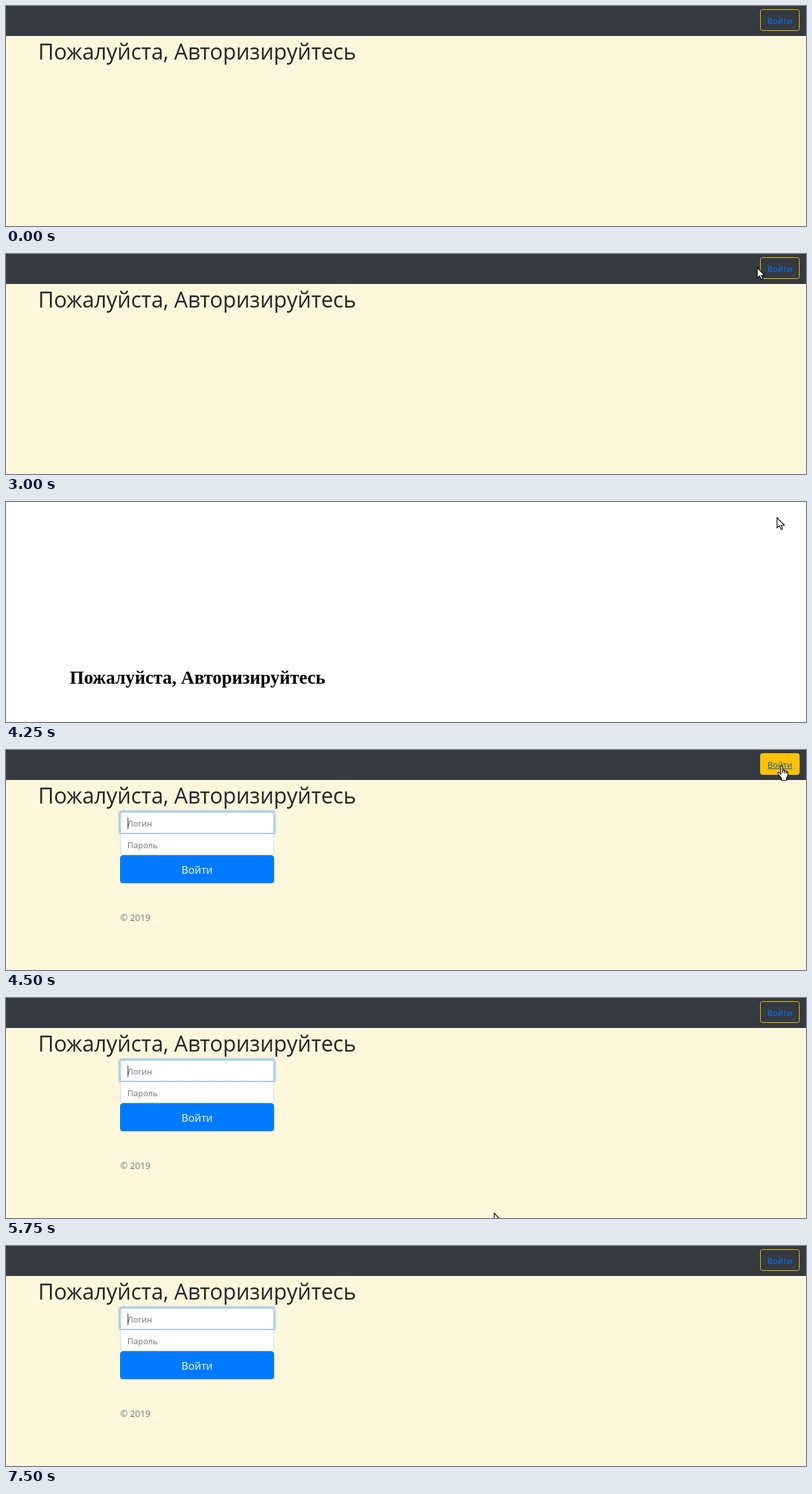
These frames come from a looping animation (1256 px wide and 345 px high, 7.75 s). An HTML page with a canvas:

```html
<!DOCTYPE html>
<html lang="ru">
<head>
<meta charset="utf-8">
<title>Вход</title>
<style>
html, body { margin: 0; width: 100%; height: 100%; overflow: hidden; background: #fff7dc; }
canvas { display: block; }
</style>
</head>
<body>
<canvas id="stage" width="1256" height="345"></canvas>
<script>
const ctx = document.getElementById('stage').getContext('2d');
const LOOP = 7750;
const SANS = '"Open Sans", "Noto Sans", sans-serif';
const SERIF = '"Liberation Serif", "Times New Roman", serif';
const HEADING = 'Пожалуйста, Авторизируйтесь';
const BLUE = '#007bff', AMBER = '#ffc107', GREY = '#6c757d';

const ARROW = new Path2D('M.5 .5V16.5L4.2 13.2L6.8 18.7H9V17.2L7 12.5H12Z');
const HAND = new Path2D('M5.5 14V2Q7 -.8 8.5 2V8Q10.2 6.8 11.5 8.6Q13.2 7.8 14.2 9.8' +
  'Q16.5 9.3 16.5 11.5V16L14.5 20V23.5H6.5V20.5L1 13.5Q.2 11 2.5 11Z');
const FINGERS = new Path2D('M8.5 8V12M11.5 8.6V12.5M14.2 9.8V13');

// Pointer stops: start time, shape, x, y
const POINTER = [
  [0, null], [1750, 'arrow', 616, 272], [2000, 'arrow', 612, 198],
  [2250, 'arrow', 611, 187], [2500, 'arrow', 763, 135], [2750, 'arrow', 1090, 51],
  [3000, 'arrow', 1179, 21], [3250, 'hand', 1200, 16], [3500, 'hand', 1211, 24],
  [4250, 'arrow', 1210, 24], [4500, 'hand', 1211, 24], [5250, 'hand', 1216, 15],
  [5500, 'arrow', 1121, 100], [5750, 'arrow', 766, 337], [6000, null]
];
const CARET = [[4500, 4750], [5250, 6000], [6250, 7000], [7500, 7750]];

const within = (t, from, to) => t >= from && t < to;

function rect(x, y, w, h, color) {
  ctx.fillStyle = color;
  ctx.fillRect(x, y, w, h);
}

function box(x, y, w, h, radius, fill, stroke) {
  ctx.beginPath();
  ctx.roundRect(x + .5, y + .5, w - 1, h - 1, radius);
  if (fill) { ctx.fillStyle = fill; ctx.fill(); }
  ctx.strokeStyle = stroke;
  ctx.lineWidth = 1;
  ctx.stroke();
}

function text(str, x, y, font, color, align = 'left') {
  ctx.font = font;
  ctx.fillStyle = color;
  ctx.textAlign = align;
  ctx.fillText(str, x, y);
}

function drawLoginLink(hover, focus) {
  box(1184, 5, 62, 34, 3.2, hover && AMBER, AMBER);
  const color = hover ? '#0056b3' : BLUE;
  text('Войти', 1215, 28, '13px ' + SANS, color, 'center');
  if (hover) rect(1196, 29, 38, 1, color);
  if (focus) {
    ctx.strokeStyle = '#343a40';
    ctx.lineWidth = 1;
    ctx.setLineDash([1, 1]);
    ctx.strokeRect(1195.5, 12.5, 39, 20);
    ctx.setLineDash([]);
  }
}

function drawForm(caret) {
  ctx.beginPath();
  ctx.roundRect(176, 94, 248, 40, 6);
  ctx.fillStyle = 'rgba(0, 123, 255, .25)';
  ctx.fill();
  box(179, 131, 242, 34, [0, 0, 3.5, 3.5], '#fff', '#ced4da');
  box(179, 97, 242, 34, [3.5, 3.5, 0, 0], '#fff', '#80bdff');
  box(179, 165, 242, 44, 4, BLUE, BLUE);
  text('Логин', 190.5, 120, '13px ' + SANS, GREY);
  text('Пароль', 190.5, 154, '13px ' + SANS, GREY);
  text('Войти', 300, 194, '16.4px ' + SANS, '#fff', 'center');
  text('© 2019', 179.5, 268, '14px ' + SANS, GREY);
  if (caret) rect(191, 106, 1, 18, '#212529');
}

function drawPointer(shape, x, y) {
  if (!shape) return;
  ctx.save();
  ctx.translate(x, y);
  ctx.lineWidth = 1.2;
  ctx.fillStyle = '#fff';
  ctx.strokeStyle = '#000';
  const path = shape === 'hand' ? HAND : ARROW;
  ctx.fill(path);
  ctx.stroke(path);
  if (shape === 'hand') ctx.stroke(FINGERS);
  ctx.restore();
}

function draw(t) {
  if (within(t, 4250, 4500)) {
    rect(0, 0, 1256, 345, '#fff');
    text(HEADING, 100, 285, 'bold 28.8px ' + SERIF, '#000');
  } else {
    rect(0, 0, 1256, 345, '#fff7dc');
    rect(0, 0, 1256, 47, '#343a40');
    drawLoginLink(within(t, 3250, 5500), within(t, 4000, 4250));
    text(HEADING, 50.5, 84, '33.8px ' + SANS, '#212529');
    if (t >= 4500) drawForm(CARET.some(([from, to]) => within(t, from, to)));
  }
  const [, shape, x, y] = POINTER.findLast(([start]) => t >= start);
  drawPointer(shape, x, y);
}

const began = performance.now();
function tick() {
  draw((performance.now() - began) % LOOP);
  requestAnimationFrame(tick);
}
tick();
</script>
</body>
</html>
```
